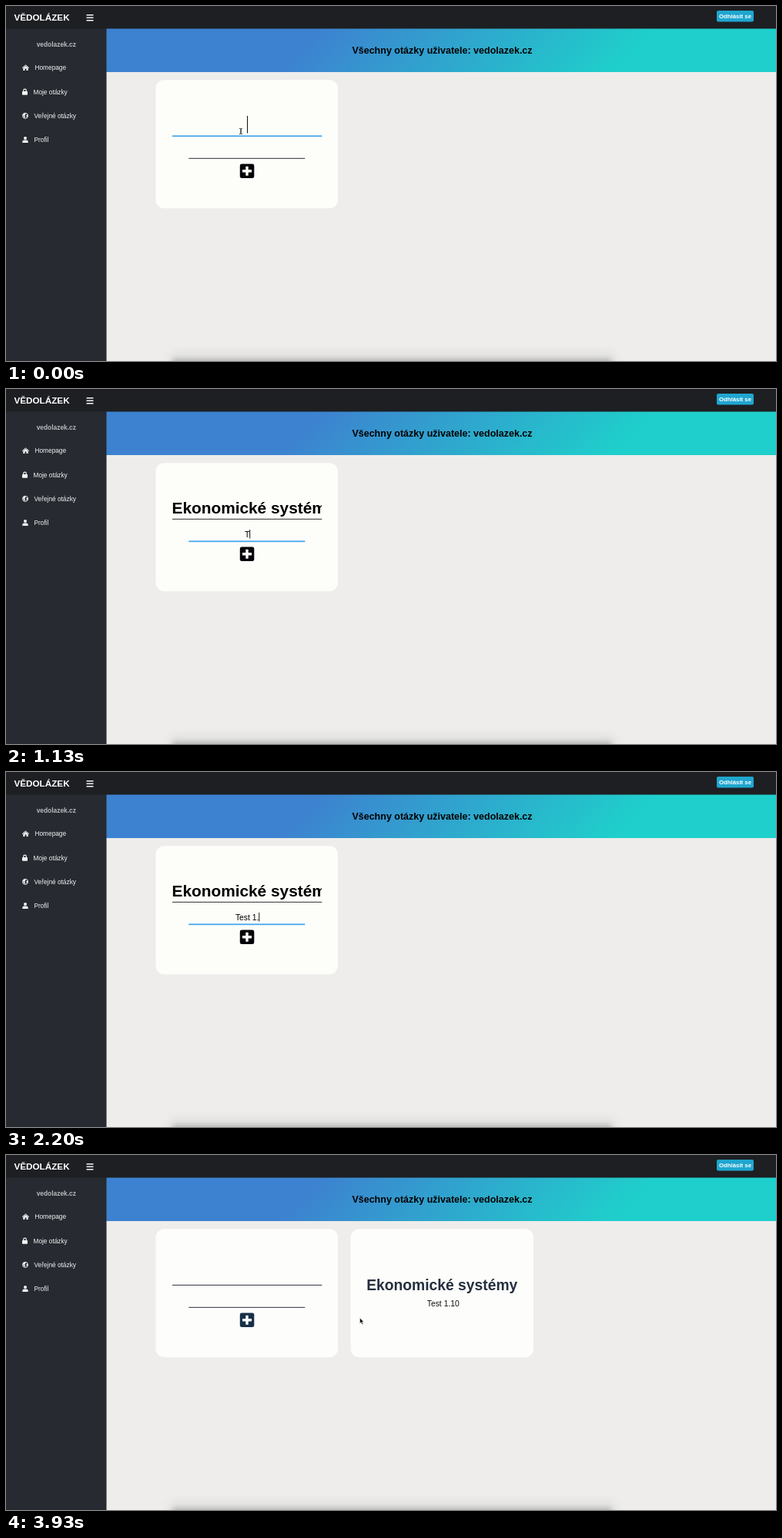
Recreate the animation shown at these times as an HTML page. Size 1000 by 462 pixels, loop 4000 ms.

```html
<!DOCTYPE html>
<html lang="cs">
<head>
<meta charset="utf-8">
<title>Otázky</title>
<style>
  html, body { margin: 0; width: 100%; height: 100%; overflow: hidden; background: #eeedec; }
  svg { display: block; width: 100%; height: 100%; }
  text { font-family: "Liberation Sans", Arial, Helvetica, sans-serif; white-space: pre; }
  .b { font-weight: 700; }
  .m { text-anchor: middle; }
  .menu text { font-size: 8.3px; fill: #f4f4f5; }
</style>
</head>
<body>
<svg viewBox="0 0 1000 462">
  <defs>
    <linearGradient id="sky" gradientUnits="userSpaceOnUse" x1="334.5" y1="-173" x2="796.5" y2="289">
      <stop offset=".3" stop-color="#3d82d0"/>
      <stop offset=".77" stop-color="#1fcfcb"/>
    </linearGradient>
    <filter id="soft" x="-10%" y="-200%" width="120%" height="500%"><feGaussianBlur stdDeviation="3"/></filter>
    <filter id="wide" x="-10%" y="-200%" width="120%" height="500%"><feGaussianBlur stdDeviation="5"/></filter>
    <clipPath id="field"><rect x="216" y="135" width="194" height="34"/></clipPath>
  </defs>

  <rect width="1000" height="462" fill="#eeedec"/>
  <rect x="210" y="448" width="584" height="40" rx="12" fill="#dededd" opacity=".6" filter="url(#wide)"/>
  <rect x="216" y="459" width="571" height="20" rx="4" fill="#b5b5b2" filter="url(#soft)"/>
  <rect x="130" y="29" width="870" height="57" fill="url(#sky)"/>
  <text class="b m" x="566.5" y="62" font-size="12.5">Všechny otázky uživatele: vedolazek.cz</text>

  <rect y="29" width="130.5" height="433" fill="#272a31"/>
  <rect width="1000" height="29.5" fill="#1d1f22"/>
  <text class="b" x="10.5" y="19" font-size="11.7" fill="#fff">VĚDOLÁZEK</text>
  <path d="M104.5 11.7h9M104.5 15.2h9M104.5 18.7h9" stroke="#f4f4f4" stroke-width="1.5"/>
  <rect x="923" y="6" width="48" height="14.5" rx="2" fill="#1fa6cf"/>
  <text class="b m" x="947" y="16.3" font-size="7.8" fill="#fff">Odhlásit se</text>

  <g class="menu">
    <text class="b m" x="65.3" y="52.7" style="font-size:8.4px;fill:#babbbd">vedolazek.cz</text>
    <text x="37.5" y="83.3">Homepage</text>
    <text x="35.5" y="114.8">Moje otázky</text>
    <text x="36.5" y="146">Veřejné otázky</text>
    <text x="36.5" y="177.3">Profil</text>
    <g fill="#f4f4f5">
      <path d="M25.5 77.8l3.2 2.8v3.3h-2.2v-2.3h-2v2.3h-2.2v-3.3z"/>
      <path d="M21 80.7l4.5-3.9 4.5 3.9" fill="none" stroke="#f4f4f5"/>
      <rect x="21" y="111" width="7" height="4.8" rx=".8"/>
      <path d="M22.7 111.5v-1.6a1.8 1.8 0 0 1 3.6 0v1.6" fill="none" stroke="#f4f4f5" stroke-width="1.2"/>
      <circle cx="25" cy="142.8" r="3.5" fill="none" stroke="#f4f4f5"/>
      <path d="M22 141l2.5-1.6 1.2 1.6-1.6 1.6.9 2-1 1.2-1.5-2.6zM26.4 142.2l1.8-.7v2.3l-1.4.9z"/>
      <circle cx="25" cy="172" r="2"/>
      <path d="M21.3 178v-1.2q0-2.2 2.2-2.2h3q2.2 0 2.2 2.2v1.2z"/>
    </g>
  </g>

  <rect id="card" x="194.5" y="96.3" width="236.5" height="167" rx="11" fill="#fdfefa"/>
  <g clip-path="url(#field)"><text id="title" class="b" y="162" font-size="20.83">Ekonomické systémy</text></g>
  <rect id="line1" x="216" width="194.3"/>
  <text id="answer" class="m" x="313.2" y="192.5" font-size="10.4"></text>
  <rect id="line2" x="237.3" width="151"/>
  <rect id="caret" width="1" fill="#111"/>
  <rect id="plus" x="303.8" y="205.6" width="18.5" height="18.5" rx="2.4"/>
  <path d="M307 214.8h12M313 208.8v12" stroke="#fdfefa" stroke-width="3.4"/>

  <g id="result">
    <rect x="447.7" y="96.3" width="237.3" height="167" rx="11" fill="#fdfdfb"/>
    <text class="b m" x="566.2" y="175.7" font-size="19.3" fill="#242f3e">Ekonomické systémy</text>
    <text class="m" x="567.8" y="197" font-size="10.4" fill="#111">Test 1.10</text>
  </g>

  <g id="beam" fill="none">
    <path d="M-2-3.7q2 0 2 1v5.4q0 1-2 1M2-3.7q-2 0-2 1v5.4q0 1 2 1" stroke="#222" stroke-width=".9"/>
  </g>
  <path id="arrow" d="M0-4v7.2l1.7-1.5 1.2 2.8 1.3-.6-1.2-2.6h2.2z" fill="#111" stroke="#fff" stroke-width=".5"/>
  <path id="hand" d="M-2-3.4q.9-.8 1.5.2l.8 2.4 3 .9q1 .4.8 1.5l-.5 2.6h-4l-2.4-2.9q-.2-1 1-.8l.8.6z" fill="#fff" stroke="#111" stroke-width=".8"/>
</svg>
<script>
const LOOP = 4000, BLUE = [69, 166, 238], BLACK = [4, 2, 8], DARK = [64, 62, 66];
const PASTE = 200, FOCUS2 = 500, SUBMIT = 3640, LEAVE = 3740;
const KEYS = [1070, 1200, 1330, 1470, 1670, 1870, 2070, 2400, 2600];
const PATH = [[0, 305, 163], [300, 305, 163], [500, 313, 187], [2850, 313, 187],
              [3180, 316.5, 217.5], [3660, 316.5, 217.5], [3880, 459.5, 216], [4000, 459.5, 216]];

const $ = id => document.getElementById(id);
const set = (id, attrs) => { for (const k in attrs) $(id).setAttribute(k, attrs[k]); };
const show = (id, on) => set(id, { visibility: on ? "visible" : "hidden" });
const clamp = v => Math.max(0, Math.min(1, v));
const mix = (a, b, k) => `rgb(${a.map((v, i) => Math.round(v + (b[i] - v) * k))})`;

function pointer(t) {
  const i = Math.max(1, PATH.findIndex(p => p[0] > t));
  const [t0, x0, y0] = PATH[i - 1], [t1, x1, y1] = PATH[i];
  const k = clamp((t - t0) / (t1 - t0)), e = k * k * (3 - 2 * k);
  return [x0 + (x1 - x0) * e, y0 + (y1 - y0) * e];
}

function underline(id, y, focused, fade) {
  set(id, { y: focused ? y - .4 : y, height: focused ? 1.8 : 1.1, fill: focused ? mix(BLUE, BLUE, 0) : fade });
}

function draw(t) {
  const first = t < FOCUS2, sent = t >= SUBMIT;
  const typed = "Test 1.10".slice(0, KEYS.filter(k => k <= t).length);

  show("title", t >= PASTE && !sent);
  set("title", first ? { x: 409, "text-anchor": "end" } : { x: 215.5, "text-anchor": "start" });
  $("answer").textContent = sent ? "" : typed;

  underline("line1", 168.8, first, mix(DARK, [62, 62, 82], sent ? 1 : 0));
  underline("line2", 197.8, !first && !sent, mix(DARK, [62, 62, 82], sent ? 1 : 0));

  const len = typed ? $("answer").getComputedTextLength() : 0;
  set("caret", first
    ? { x: t < PASTE ? 313 : 409, y: 143, height: 22.5 }
    : { x: 313 + len / 2, y: 183, height: 11.5 });
  show("caret", t < 3130);

  const hover = clamp((t - 3100) / 150) * (1 - .72 * clamp((t - LEAVE) / 190));
  set("plus", { fill: mix(BLACK, BLUE, hover) });
  set("card", { fill: sent ? "#fdfdfb" : "#fdfefa" });
  show("result", sent);

  const [x, y] = pointer(t);
  const over = t > 3090 && x < 323;
  for (const id of ["beam", "arrow", "hand"]) set(id, { transform: `translate(${x.toFixed(2)} ${y.toFixed(2)})` });
  show("beam", t < KEYS[0] || (t > 2850 && y < 199));
  show("hand", over);
  show("arrow", t > 2850 && y >= 199 && !over);
}

function tick(now) {
  draw(now % LOOP);
  requestAnimationFrame(tick);
}
draw(0);
requestAnimationFrame(tick);
</script>
</body>
</html>
```
